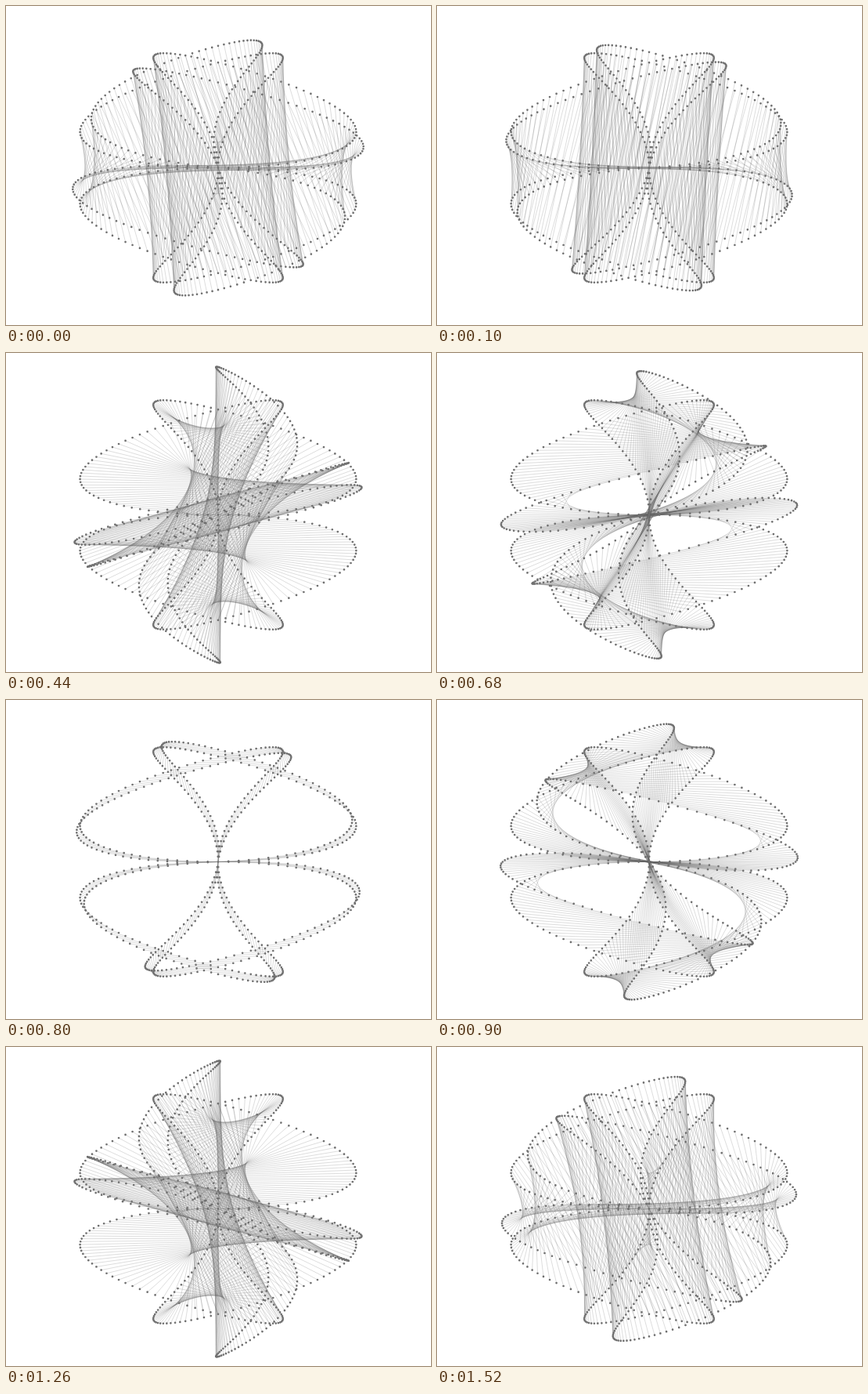
These frames come from a looping animation (543 px wide and 407 px high, 1600 ms). An HTML page with a canvas:

```html
<!DOCTYPE html>
<html lang="en">
<head>
<meta charset="utf-8">
<title>String curves</title>
<style>
  html, body { margin: 0; height: 100%; overflow: hidden; background: #fff; }
  canvas { display: block; }
</style>
</head>
<body>
<canvas id="stage" width="543" height="407"></canvas>
<script>
const ctx = document.getElementById('stage').getContext('2d');
const CX = 271, CY = 206.5, RADIUS = 190, POINTS = 360;
const DEGREE = Math.PI / 180;
const FIRST_PHASE = 160, PHASE_STEP = 16; // degrees

// How long each pose is held, in ms; the phase advances evenly per pose.
const HOLDS = [20, 80, 80, 80, 80, 100, 100, 80, 60, 60, 40, 20,
               20, 20, 60, 80, 80, 100, 100, 100, 80, 80, 80];
const LOOP = HOLDS.reduce((sum, ms) => sum + ms, 0);

const curvePoint = (t, phase) => [
  CX + RADIUS * Math.sin(4 * t + 2 * phase) * Math.cos(t),
  CY - RADIUS * Math.sin(2 * t + phase) * Math.sin(t)
];

function poseAt(ms) {
  let pose = 0;
  while (ms >= HOLDS[pose]) ms -= HOLDS[pose++];
  return pose;
}

function draw(pose) {
  const phase = (FIRST_PHASE + pose * PHASE_STEP) * DEGREE;
  const dots = new Path2D();
  ctx.clearRect(0, 0, 543, 407);
  ctx.lineWidth = 0.5;
  ctx.strokeStyle = 'rgba(100, 100, 100, 0.43)';
  for (let i = 0; i < POINTS; i++) {
    const t = i * 2 * Math.PI / POINTS;
    ctx.beginPath();
    for (const [x, y] of [curvePoint(t, 0), curvePoint(t, phase)]) {
      ctx.lineTo(x, y);
      dots.moveTo(x, y);
      dots.arc(x, y, 1.35, 0, 2 * Math.PI);
    }
    ctx.stroke();
  }
  ctx.fillStyle = '#707070';
  ctx.fill(dots);
}

function tick() {
  draw(poseAt(performance.now() % LOOP));
  requestAnimationFrame(tick);
}
tick();
</script>
</body>
</html>
```
